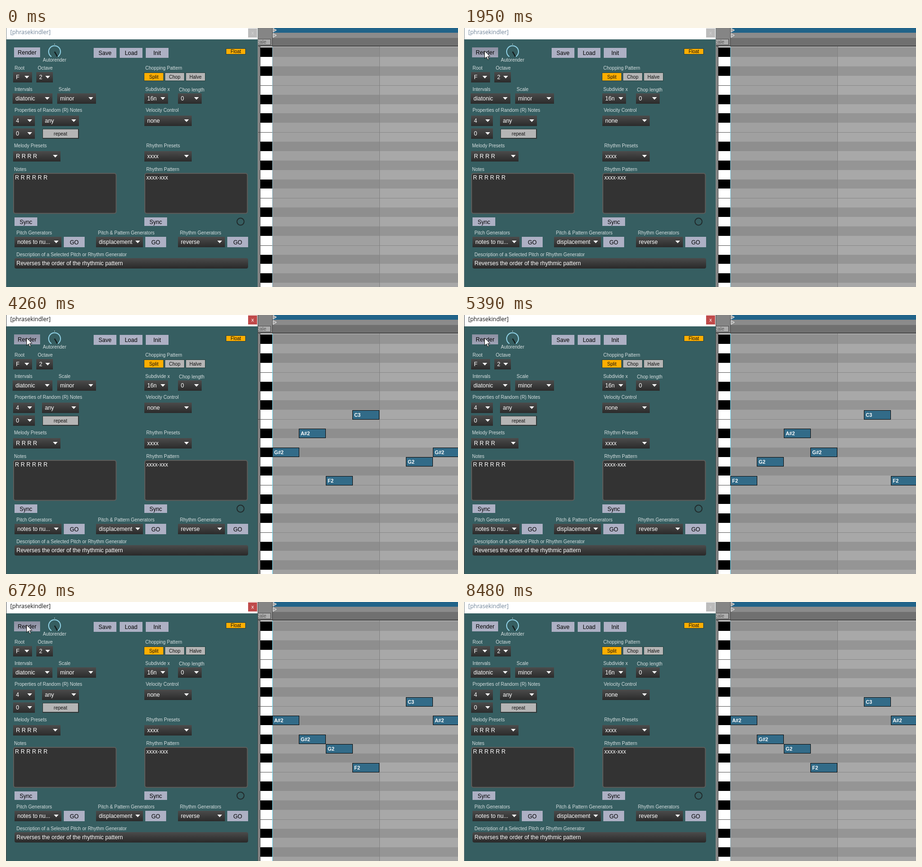
An HTML page with a canvas that plays this animation: 954x547 px, repeating every 8550 ms.

```html
<!DOCTYPE html>
<html lang="en">
<head>
<meta charset="utf-8">
<title>Melody generator</title>
<style>
html, body { margin: 0; width: 100%; height: 100%; overflow: hidden; background: #365e61; }
canvas { display: block; }
</style>
</head>
<body>
<canvas id="stage" width="954" height="547"></canvas>
<script>
const ctx = document.getElementById('stage').getContext('2d');
const LOOP = 8550;
const SANS = '"Liberation Sans", Arial, sans-serif';
const ROW = 19.87, BEAT = 56.5, ROLL_X = 562;
const ENTER = [540, 1600], LEAVE = [7150, 7950];
const ACTIVE = [2650, 8120];
const PITCH_ROW = { 'C3': 8, 'A#2': 10, 'G#2': 12, 'G2': 13, 'F2': 15 };
const RENDERS = [
  { at: 2650, notes: 'F2 C3 G2 G#2 - A#2 F2' },
  { at: 3850, notes: 'G#2 A#2 F2 C3 - G2 G#2' },
  { at: 5240, notes: 'F2 G2 A#2 G#2 - C3 F2' },
  { at: 6440, notes: 'A#2 G#2 G2 F2 - C3 A#2' }
];

const LABELS = [
  ['Root', 18, 88], ['Octave', 67, 88], ['Chopping Pattern', 294, 88],
  ['Intervals', 18, 133], ['Scale', 111, 133], ['Subdivide x', 294, 133], ['Chop length', 365, 134],
  ['Properties of Random (R) Notes', 18, 177], ['Velocity Control', 295, 177],
  ['Melody Presets', 17, 252], ['Rhythm Presets', 296, 252],
  ['Notes', 17, 302], ['Rhythm Pattern', 296, 302],
  ['Pitch Generators', 22, 436], ['Pitch & Pattern Generators', 194, 436],
  ['Rhythm Generators', 367, 436],
  ['Description of a Selected Pitch or Rhythm Generator', 22, 482]
];
const MENUS = [
  ['F', 15, 93, 40], ['2', 64, 93, 35], ['diatonic', 14, 138, 84], ['minor', 108, 138, 82],
  ['16n', 292, 138, 50], ['0', 363, 138, 50], ['4', 15, 185, 46], ['any', 76, 185, 78],
  ['none', 292, 185, 100], ['0', 15, 212, 46], ['R R R R', 15, 260, 100], ['xxxx', 292, 260, 100],
  ['notes to nu...', 18, 441, 99], ['displacement', 190, 441, 99], ['reverse', 363, 441, 99]
];
const BUTTONS = [
  ['Save', 185, 42, 48, 21], ['Load', 240, 42, 48, 21], ['Init', 295, 42, 48, 21],
  ['Sync', 18, 400, 48, 18], ['Sync', 292, 400, 48, 18],
  ['GO', 122, 441, 44, 22], ['GO', 294, 441, 44, 22], ['GO', 467, 441, 44, 22]
];

function box(x, y, w, h, fill) {
  ctx.fillStyle = fill;
  ctx.fillRect(x, y, w, h);
}
function text(str, x, y, color, font = '12px ' + SANS, align = 'left') {
  ctx.fillStyle = color;
  ctx.font = font;
  ctx.textAlign = align;
  ctx.fillText(str, x, y);
}
function shape(points, fill, stroke) {
  ctx.beginPath();
  points.forEach(([x, y]) => ctx.lineTo(x, y));
  ctx.closePath();
  if (fill) { ctx.fillStyle = fill; ctx.fill(); }
  if (stroke) { ctx.strokeStyle = stroke; ctx.lineWidth = 1; ctx.stroke(); }
}
function rounded(x, y, w, h, r, fill, stroke) {
  ctx.beginPath();
  ctx.roundRect(x, y, w, h, r);
  ctx.fillStyle = fill;
  ctx.fill();
  if (stroke) { ctx.strokeStyle = stroke; ctx.lineWidth = 2; ctx.stroke(); }
}
function arc(x, y, r, from, to, color) {
  ctx.beginPath();
  ctx.arc(x, y, r, from, to);
  ctx.strokeStyle = color;
  ctx.lineWidth = 2;
  ctx.stroke();
}
function shade(y, h, top, bottom) {
  const g = ctx.createLinearGradient(0, y, 0, y + h);
  g.addColorStop(0, top);
  g.addColorStop(1, bottom);
  return g;
}
const rowY = row => Math.round(41.4 + ROW * row);

function button(label, x, y, w, h, fill = '#adb0c4') {
  box(x, y, w, h, fill);
  text(label, x + w / 2, y + h / 2 + 4.5, '#000', undefined, 'center');
}
function smallButton(label, x, y, w, h, fill) {
  box(x, y, w, h, '#27403f');
  box(x + 1, y + 1, w - 2, h - 2, fill);
  text(label, x + w / 2, y + h / 2 + 3.5, '#111', '10px ' + SANS, 'center');
}
function menu(label, x, y, w) {
  box(x, y, w, 22, shade(y, 22, '#4b4b4b', '#2b2b2b'));
  text(label, x + 6, y + 15, '#fff');
  const cx = x + w - 11;
  shape([[cx - 5, y + 8], [cx + 5, y + 8], [cx, y + 13.5]], '#fff');
}

function drawRoll(t) {
  box(531, 0, 423, 547, '#858585');
  box(562, 0, 392, 10, '#216389');
  box(562, 10, 392, 11, '#8b8b8b');
  box(562, 21, 392, 17, '#707070');
  box(531, 37, 423, 2, '#4b4b4b');
  box(528, 23, 31, 13, '#4a4a4a');
  box(528, 24, 30, 11, '#acacac');
  text('Scale', 523, 33, '#555', '10.5px ' + SANS);

  for (let row = -1; row < 26; row++) {
    const y = Math.max(39, rowY(row)), h = rowY(row + 1) - y;
    const black = [0, 2, 5, 7, 10].includes((row + 12) % 12);
    box(537, y, 25, h, black ? '#000' : '#fff');
    box(562, y, 226, h, black ? '#8e8e8e' : '#a0a0a0');
    box(788, y, 166, h, black ? '#959595' : '#a8a8a8');
    if ([4, 9].includes(row % 12)) {
      box(537, y, 25, 1, '#555');
      box(562, y, 392, 1, '#888');
    }
  }
  box(536, 39, 1, 508, '#4b4b4b');
  box(531, 220, 5, 1, '#444');
  box(788, 39, 1, 508, '#808080');
  box(562, 0, 1, 39, '#444');
  for (const y of [0, 11]) shape([[563.5, y + .5], [571, y + 4.5], [563.5, y + 9]], '#a4a4a4', '#eee');

  const pulse = (1 + Math.cos((t - 5460) / 1260 * 2 * Math.PI)) / 2;
  const mix = (a, b) => Math.round(a + (b - a) * pulse);
  box(562, 39, 1, 508, `rgb(${mix(143, 110)},${mix(165, 218)},${mix(175, 245)})`);

  const render = RENDERS.filter(r => r.at <= t).pop();
  if (!render) return;
  render.notes.split(' ').forEach((pitch, i) => {
    if (pitch === '-') return;
    const x = Math.round(ROLL_X + i * BEAT - .2), y = Math.round(41.7 + ROW * PITCH_ROW[pitch]);
    box(x, y, 57, 20, '#0a0a0a');
    box(x + 1, y + 1, 55, 18, '#326b88');
    text(pitch, x + 4, y + 13.5, '#fff', 'bold 10.5px ' + SANS);
  });
}

function drawWindow(t) {
  const active = t >= ACTIVE[0] && t < ACTIVE[1];
  box(0, 0, 531, 24, '#fff');
  box(0, 24, 531, 523, '#365e61');
  box(0, 0, 1, 547, active ? '#454b4c' : '#7d8787');
  box(531, 0, 1, 547, active ? '#454b4c' : '#7d8787');
  text('[phrasekindler]', 9, 13, active ? '#111' : '#718599', '12px "Open Sans", sans-serif');
  box(511, 1, 19, 19, active ? '#c04a4a' : '#bcbcbc');
  text('x', 520.5, 14, active ? '#fff' : '#d4d4d4', '11px ' + SANS, 'center');

  const hover = t > ENTER[1] - 100 && t < LEAVE[0] + 100;
  const pressed = RENDERS.some(r => t >= r.at - 70 && t < r.at + 70);
  button('Render', 17, 41, 55, 21, pressed ? '#7d8092' : hover ? shade(41, 21, '#8d90a2', '#a0a3b6') : undefined);
  BUTTONS.forEach(b => button(...b));
  LABELS.forEach(([str, x, y]) => text(str, x, y, '#d6dfe0', '10px ' + SANS));
  text('Autorender', 102.5, 71, '#d6dfe0', '10px ' + SANS, 'center');
  MENUS.forEach(m => menu(...m));

  smallButton('Float', 464, 43, 42, 13, '#ffae00');
  smallButton('Split', 291, 94, 42, 18, '#ffae00');
  smallButton('Chop', 335, 94, 42, 18, '#b5b5b5');
  smallButton('Halve', 379, 94, 42, 18, '#b5b5b5');
  box(77, 213, 77, 21, '#303838');
  box(78, 214, 74, 18, '#b5b5b5');
  text('repeat', 115, 226.5, '#111', '10px ' + SANS, 'center');

  // Knob
  arc(102.5, 50, 12.5, Math.PI * .68, Math.PI * 2.32, '#8fd0e4');
  box(102, 33, 1, 2, '#d6dfe0');
  ctx.beginPath();
  ctx.moveTo(102.5, 50);
  ctx.lineTo(108.5, 60.5);
  ctx.strokeStyle = '#151c1d';
  ctx.lineWidth = 2.5;
  ctx.stroke();

  rounded(16, 307, 216.5, 84.5, 4, '#333', '#5c5c5a');
  rounded(293, 307, 216.5, 84.5, 4, '#333', '#5c5c5a');
  text('R R R R R R', 19, 320, '#fff');
  text('xxxx-xxx', 296, 320, '#fff');
  arc(495, 409, 7.5, 0, Math.PI * 2, '#222c2d');
  rounded(18, 486, 493, 22, 4, shade(486, 22, '#4b4b4b', '#292929'));
  text('Reverses the order of the rhythmic pattern', 22, 501, '#fff');
}

function bezier(u, a, b, c, d) {
  const v = 1 - u;
  return v * v * v * a + 3 * v * v * u * b + 3 * v * u * u * c + u * u * u * d;
}
function drawCursor(t) {
  if (t < ENTER[0] || t >= LEAVE[1]) return;
  const progress = ([from, to]) => {
    const u = Math.min(1, Math.max(0, (t - from) / (to - from)));
    return u * u * (3 - 2 * u);
  };
  const arriving = t < LEAVE[0];
  const u = arriving ? progress(ENTER) : 1 - progress(LEAVE);
  const x = bezier(u, arriving ? 732 : 806, 500, 120, 43.5);
  const y = bezier(u, 549, 530, 360, 48.5);
  const arrow = [[0, 0], [0, 16], [4, 12.5], [6.5, 18.5], [9, 17.5], [6.5, 11.5], [11.5, 11.5]];
  shape(arrow.map(([dx, dy]) => [x + dx, y + dy]), '#fff', '#111');
}

function draw(now) {
  const t = now % LOOP;
  drawRoll(t);
  drawWindow(t);
  drawCursor(t);
  requestAnimationFrame(draw);
}
requestAnimationFrame(draw);
</script>
</body>
</html>
```
